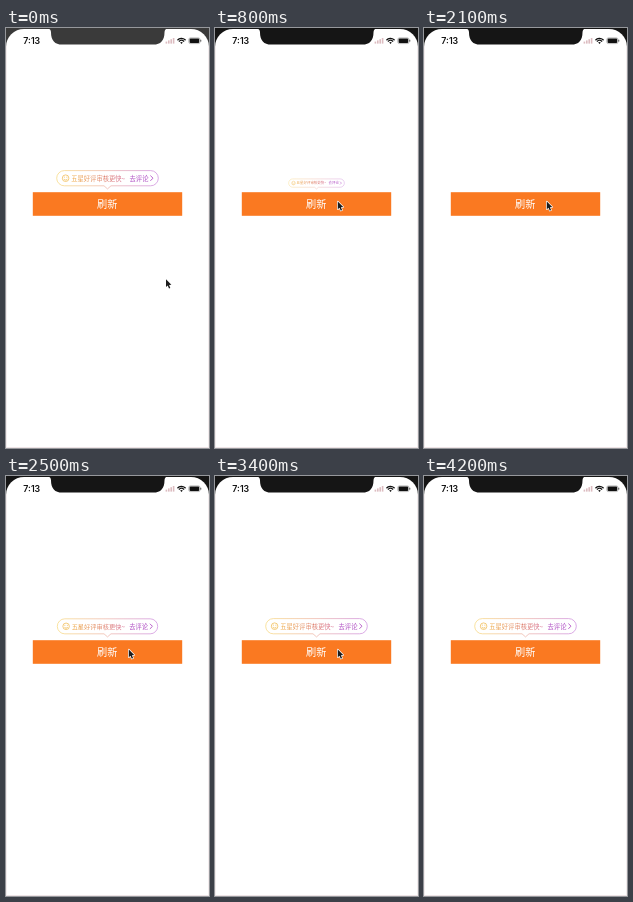
Animation, 203 px wide and 420 px high, one loop 4.3 s. Source, as an HTML page with a canvas:

```html
<!DOCTYPE html>
<html lang="zh">
<head>
<meta charset="utf-8">
<style>
  html, body { margin: 0; width: 100%; height: 100%; overflow: hidden; background: #fff; }
  canvas { display: block; width: 203px; height: 420px; }
</style>
</head>
<body>
<canvas id="stage"></canvas>
<script>
const W = 203, H = 420, LOOP = 4300;
const HIDE_MS = 300, SHOW_MS = 520;
const taps = [
  { hide: 235, show: 680 },
  { hide: 1430, show: 2100 },
  { hide: 2580, show: 2800 },
  { hide: 3420, show: 3680 }
];
// time, x, y of the pointer tip
const pointerPath = [
  [0, 160, 251.2], [60, 160, 251.2], [260, 122.8, 173.4],
  [3780, 122.8, 173.4], [3900, 152, 195], [4120, 206, 238]
];
const CJK = '"Noto Sans CJK SC", "Noto Sans CJK", sans-serif';

const canvas = document.getElementById('stage');
const ctx = canvas.getContext('2d');
const dpr = window.devicePixelRatio || 1;
canvas.width = Math.round(W * dpr);
canvas.height = Math.round(H * dpr);

const clamp = v => Math.max(0, Math.min(1, v));
const smooth = p => p * p * (3 - 2 * p);
const easeOut = p => 1 - (1 - p) ** 3;

function bubbleScale(t) {
  let scale = 1;
  for (const { hide, show } of taps) {
    if (t >= show) scale = easeOut(clamp((t - show) / SHOW_MS));
    else if (t >= hide) scale = 1 - smooth(clamp((t - hide) / HIDE_MS));
  }
  return scale;
}

function pointerAt(t) {
  for (let i = 1; i < pointerPath.length; i++) {
    const [t0, x0, y0] = pointerPath[i - 1];
    const [t1, x1, y1] = pointerPath[i];
    if (t < t1) {
      const p = (t - t0) / (t1 - t0);
      const e = i === 2 ? smooth(p) : p;
      return [x0 + (x1 - x0) * e, y0 + (y1 - y0) * e];
    }
  }
  return null;
}

function label(text, x, y, font, color, align = 'left') {
  ctx.font = font;
  ctx.fillStyle = color;
  ctx.textAlign = align;
  ctx.textBaseline = 'alphabetic';
  ctx.fillText(text, x, y);
}

function polyline(points) {
  ctx.beginPath();
  points.forEach(([x, y], i) => i ? ctx.lineTo(x, y) : ctx.moveTo(x, y));
}

function drawScreen(t) {
  const frame = t < 100 ? '#3a3a3a' : '#151515';
  ctx.fillStyle = frame;
  ctx.fillRect(0, 0, W, 30);
  ctx.fillStyle = '#fff';
  ctx.beginPath();
  ctx.roundRect(0, 0.9, W, H + 20, 18);
  ctx.fill();
  ctx.fillRect(0, 30, W, H);
  ctx.fillStyle = '#eee4e6';
  ctx.fillRect(0, 18, 0.7, H);
  ctx.fillRect(W - 0.7, 18, 0.7, H);
  ctx.fillRect(0, H - 1, W, 1);

  ctx.fillStyle = frame;
  ctx.beginPath();
  ctx.moveTo(42, 0.5);
  ctx.quadraticCurveTo(45, 1, 45, 4.5);
  ctx.bezierCurveTo(45, 12.5, 49, 16.6, 56, 16.6);
  ctx.lineTo(147.5, 16.6);
  ctx.bezierCurveTo(154.5, 16.6, 158.5, 12.5, 158.5, 4.5);
  ctx.quadraticCurveTo(158.5, 1, 161.5, 0.5);
  ctx.fill();
}

function drawStatus() {
  label('7:13', 17.3, 16, '600 8.8px Inter, sans-serif', '#111');

  ctx.fillStyle = '#dcbcc0';
  for (let i = 0; i < 4; i++) {
    const h = 2 + i * 1.2;
    ctx.fillRect(159.6 + i * 2.4, 15.6 - h, 1.6, h);
  }

  ctx.strokeStyle = ctx.fillStyle = '#111';
  ctx.lineWidth = 1.25;
  for (const r of [5.4, 3.4]) {
    ctx.beginPath();
    ctx.arc(175.5, 15.8, r, -Math.PI * 0.77, -Math.PI * 0.23);
    ctx.stroke();
  }
  ctx.beginPath();
  ctx.moveTo(175.5, 15.9);
  ctx.arc(175.5, 15.8, 1.8, -Math.PI * 0.77, -Math.PI * 0.23);
  ctx.fill();

  ctx.lineWidth = 0.5;
  ctx.strokeStyle = '#777';
  ctx.beginPath();
  ctx.roundRect(182.8, 9.9, 11.2, 5.7, 1.6);
  ctx.stroke();
  ctx.beginPath();
  ctx.roundRect(183.6, 10.6, 9.6, 4.3, 0.9);
  ctx.fill();
  ctx.fillRect(194.5, 11.8, 0.7, 1.8);
}

function drawButton() {
  ctx.fillStyle = '#fa7921';
  ctx.fillRect(26.8, 164.2, 149.4, 23.6);
  label('刷新', 101.3, 179.9, '300 10.2px ' + CJK, '#fff', 'center');
}

function drawBubble(scale) {
  if (scale < 0.01) return;
  ctx.save();
  ctx.translate(101.5, 161);
  ctx.scale(scale, scale);
  ctx.translate(-101.5, -161);

  const tint = ctx.createLinearGradient(50, 0, 153, 0);
  tint.addColorStop(0, '#f8dc86');
  tint.addColorStop(0.5, '#efb9ae');
  tint.addColorStop(1, '#cf92e2');

  ctx.beginPath();
  ctx.moveTo(58.3, 142.6);
  ctx.lineTo(144.7, 142.6);
  ctx.arc(144.7, 150.2, 7.6, -Math.PI / 2, Math.PI / 2);
  ctx.lineTo(105, 157.8);
  ctx.lineTo(101.5, 160.9);
  ctx.lineTo(98, 157.8);
  ctx.lineTo(58.3, 157.8);
  ctx.arc(58.3, 150.2, 7.6, Math.PI / 2, Math.PI * 1.5);
  ctx.closePath();
  ctx.fillStyle = '#fff';
  ctx.fill();
  ctx.strokeStyle = tint;
  ctx.lineWidth = 0.8;
  ctx.stroke();

  ctx.strokeStyle = ctx.fillStyle = '#f2bf5c';
  ctx.beginPath();
  ctx.arc(59.6, 150.2, 3.3, 0, Math.PI * 2);
  ctx.stroke();
  ctx.beginPath();
  ctx.arc(59.6, 150.5, 1.6, 0.2, Math.PI - 0.2);
  ctx.stroke();
  ctx.fillRect(57.9, 148.7, 0.9, 0.9);
  ctx.fillRect(60.4, 148.7, 0.9, 0.9);

  const copy = ctx.createLinearGradient(65, 0, 119, 0);
  copy.addColorStop(0, '#efac45');
  copy.addColorStop(1, '#d76f91');
  label('五星好评审核更快~', 65.2, 152.6, '6.3px ' + CJK, copy);
  label('去评论', 123.4, 152.6, '500 6.4px ' + CJK, '#b04fc4');

  polyline([[144.4, 147.6], [147, 150.2], [144.4, 152.8]]);
  ctx.strokeStyle = '#b04fc4';
  ctx.lineWidth = 0.9;
  ctx.stroke();
  ctx.restore();
}

function drawPointer(t) {
  const at = pointerAt(t);
  if (!at) return;
  ctx.save();
  ctx.translate(...at);
  polyline([[0, 0], [0, 7.8], [1.7, 6.3], [3, 9.3], [4.3, 8.7], [3.1, 5.8], [5.4, 5.6]]);
  ctx.closePath();
  ctx.lineJoin = 'round';
  ctx.strokeStyle = '#fff';
  ctx.lineWidth = 1.4;
  ctx.stroke();
  ctx.fillStyle = '#1c1c1c';
  ctx.fill();
  ctx.restore();
}

function draw(t) {
  ctx.setTransform(dpr, 0, 0, dpr, 0, 0);
  ctx.clearRect(0, 0, W, H);
  drawScreen(t);
  drawStatus();
  drawButton();
  drawBubble(bubbleScale(t));
  drawPointer(t);
}

const start = performance.now();
function tick() {
  draw((performance.now() - start) % LOOP);
  requestAnimationFrame(tick);
}
tick();
</script>
</body>
</html>
```
